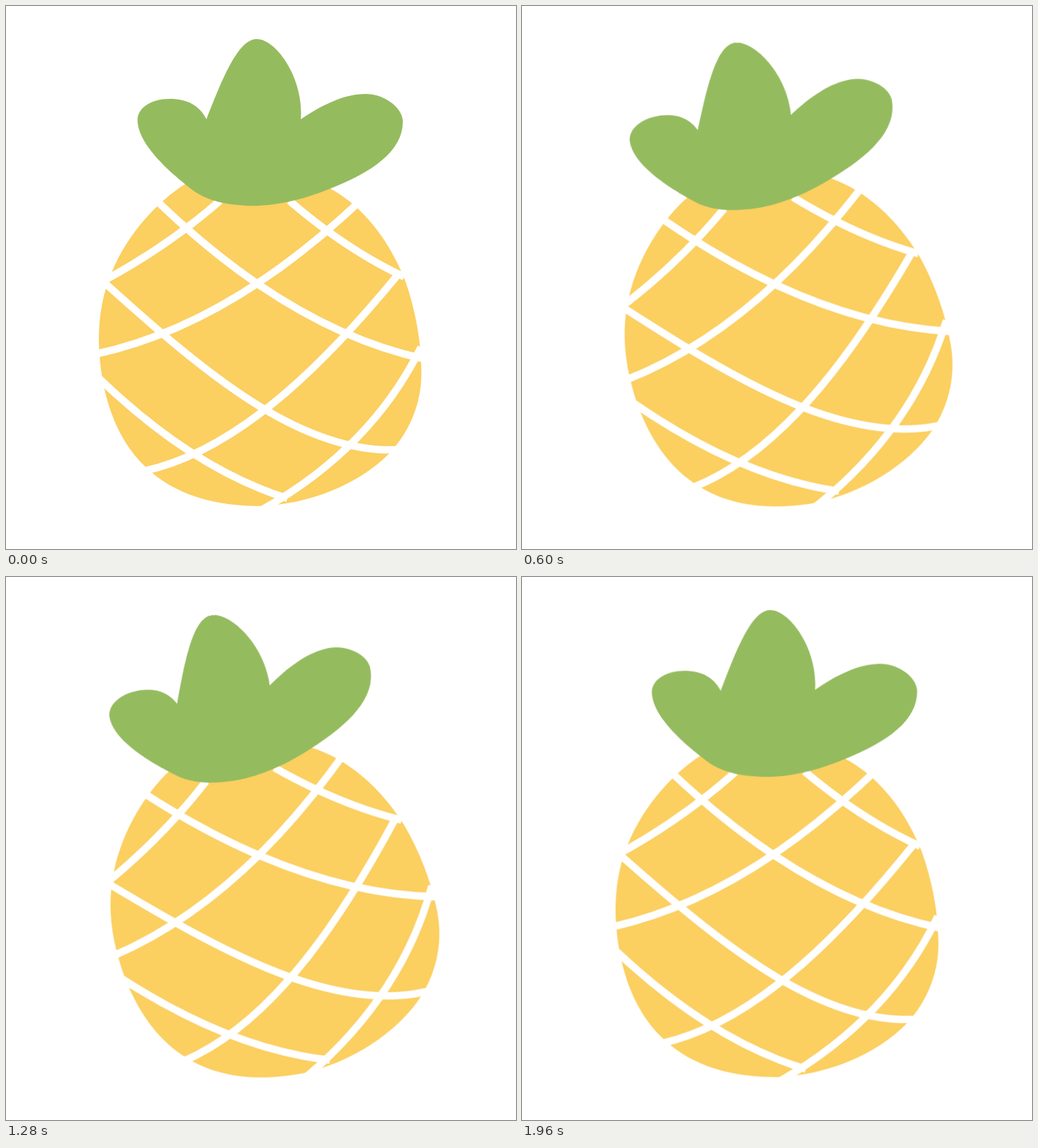
An HTML page that plays this animation: 725 px wide and 772 px high, repeating every 2000 ms.

```html
<!DOCTYPE html>
<html lang="en">
<head>
<meta charset="utf-8">
<title>Swaying pineapple</title>
<style>
  html, body { margin: 0; width: 100%; height: 100%; overflow: hidden; background: #fff; }
  svg { display: block; width: 725px; height: 772px; }
  .fruit {
    transform-origin: 362.5px 384px;
    /* small head start keeps each step on its side of the 40 ms boundary */
    animation: sway 2s -2ms infinite;
  }
  .body { fill: #fbcf60; }
  .leaves { fill: #95bb5f; }
  .lines { fill: none; stroke: #fff; stroke-width: 10.5; }
  @keyframes sway {
    0%, 100% { transform: rotate(0deg); animation-timing-function: steps(25, end); }
    50% { transform: rotate(-15.5deg); animation-timing-function: steps(25, end); }
  }
</style>
</head>
<body>
<svg viewBox="0 0 725 772">
  <g class="fruit">
    <path class="body" d="M255 253
      C211 281 171 328 150.5 378
      C138 408 132 438 132 475
      C133 545 153.5 612 197 654
      C239 696 300 711 360 711
      C430 709 502 680 545 636
      C575 604 591 563 590.5 520
      C590.5 478 582 432 568 392
      C545 333 508 285 460 259Z"/>
    <g class="lines">
      <!-- falling to the right -->
      <path d="M403 277Q484.5 347 566 385"/>
      <path d="M212 274.7L217 279.5Q406 461 595 502"/>
      <path d="M139 392.3L143 396C279 518.5 416 635.5 554 631"/>
      <path d="M130 527L134 531Q267 658.5 400 700"/>
      <!-- falling to the left -->
      <path d="M304 277Q232 340 142 389"/>
      <path d="M500 280L496 284C420 355 290 460 127 495"/>
      <path d="M558 381C470 488 340 630 197 661"/>
      <path d="M590 485C545 577 470 657 364 716"/>
    </g>
    <path class="leaves" d="M285 161
      C304.5 112 328.5 47 356 47
      C385 47 424 105 419 161
      C450 140 482 125 511 125
      C537 125 562 143 564 162
      C566 205 522 236 460 260
      C425 274 388 284 352 284
      C320 284 290 278 270 265
      C235 239 187 197 187 162
      C187 145 206 132 233 132
      C257 132 275 141 285 161Z"/>
  </g>
</svg>
</body>
</html>
```
